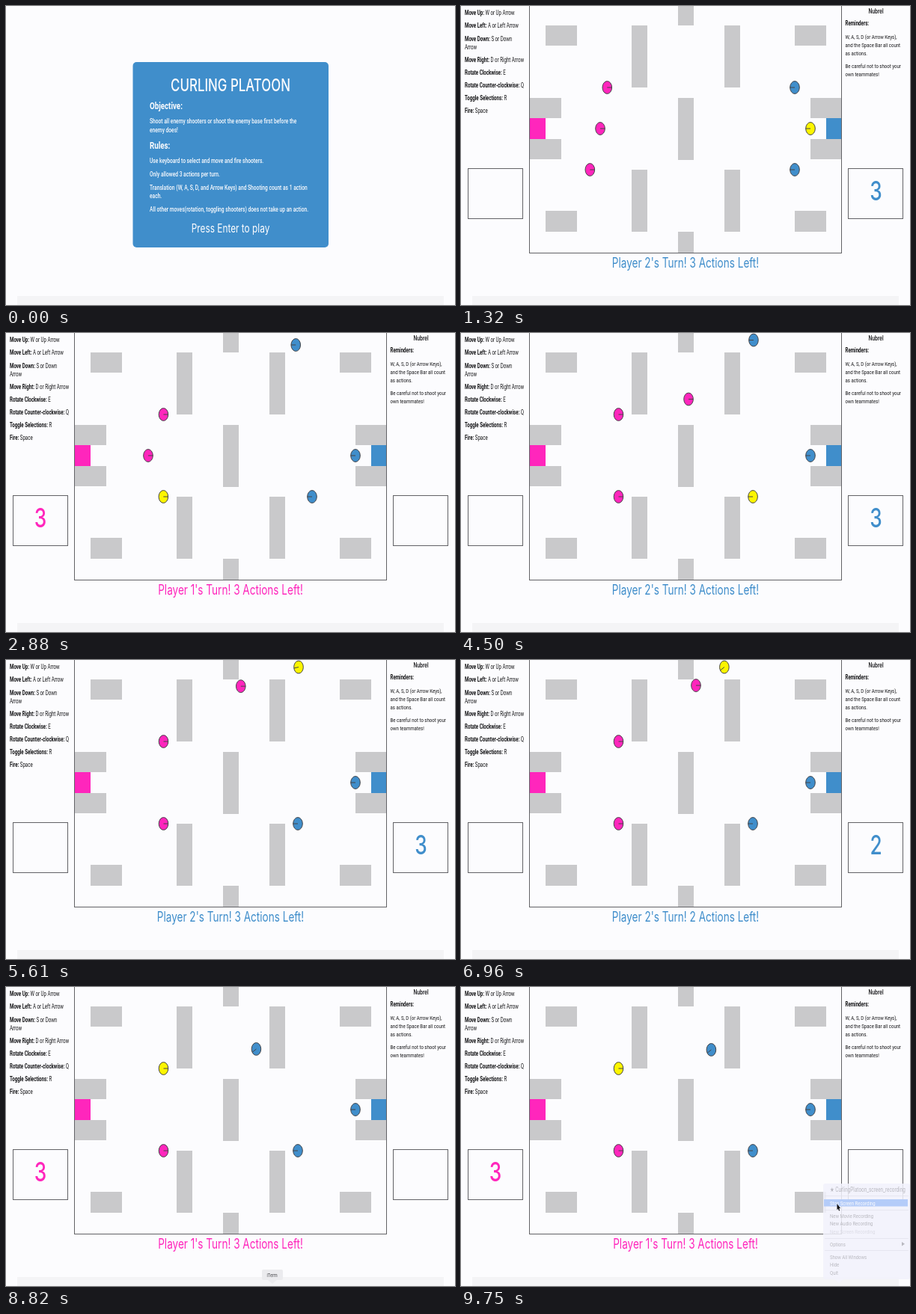
Recreate the animation shown at these times as an HTML page with a canvas. Size 600 by 400 pixels, loop 9.78 s.

```html
<!DOCTYPE html>
<html lang="en">
<head>
<meta charset="utf-8">
<title>Curling Platoon</title>
<style>
  html, body { margin: 0; width: 100%; height: 100%; overflow: hidden; background: #fcfcfe; }
  canvas { display: block; width: 600px; height: 400px; }
</style>
</head>
<body>
<canvas id="stage" width="600" height="400"></canvas>
<script>
const ctx = document.getElementById('stage').getContext('2d');
const LOOP = 9780, GAME_START = 360, FRICTION = 3.5;
const PAPER = '#fcfcfe', INK = '#161618', LINE = '#626266', WALL = '#c9c9cb';
const PINK = '#ff26bc', BLUE = '#408ecb', YELLOW = '#fdf500', WHITE = '#fcfcfe';
const BODY = 'Roboto, "Open Sans", sans-serif', DISPLAY = 'Inter, sans-serif';
const NARROW = 0.75;
const FIRE = 7300, HIT = 7450, AIM = 2.59;

const walls = [
  [290, -2, 21, 28], [290, 123, 21, 83], [290, 302, 21, 28]
];
for (const x of [113, 446]) walls.push([x, 26, 42, 27], [x, 274, 42, 28]);
for (const x of [228, 352]) walls.push([x, 26, 21, 83], [x, 219, 21, 83]);
for (const x of [92, 467]) walls.push([x, 123, 42, 27], [x, 178, 42, 27]);

// Each push: start time, total dx, total dy.
const shooters = [
  { team: 1, slot: 0, x: 154, y: 109, pushes: [[946, 56.5, 0]] },
  { team: 1, slot: 1, x: 133, y: 164, pushes: [[560, 57, 0], [3300, 0, -74.5], [3780, 124, 0], [4490, 0, -55.5]] },
  { team: 1, slot: 2, x: 154, y: 219, pushes: [[1209, 56.5, 0]] },
  { team: 2, slot: 0, x: 446, y: 109, pushes: [[1700, -64, 0], [2100, 0, -99.5], [2700, 9, 0], [6625, -56.6, 0], [7600, 0, 74.5]] },
  { team: 2, slot: 1, x: 467, y: 164, pushes: [] },
  { team: 2, slot: 2, x: 446, y: 219, pushes: [[2572, -56, 0]] }
];

// Time, player, actions left, selected slot.
const turns = [
  [0, 1, 3, 1], [560, 1, 2, 1], [760, 1, 2, 0], [946, 1, 1, 0], [1080, 1, 1, 2],
  [1209, 2, 3, 1], [1500, 2, 3, 0], [1700, 2, 2, 0], [2100, 2, 1, 0], [2350, 2, 1, 2],
  [2572, 1, 3, 2], [3050, 1, 3, 1], [3300, 1, 2, 1], [3780, 1, 1, 1],
  [4490, 2, 3, 2], [5000, 2, 3, 0], [6625, 2, 2, 0], [FIRE, 2, 1, 0], [7600, 1, 3, 0]
];

const progress = (t, from, to) => Math.min(1, Math.max(0, (t - from) / (to - from)));

function box(x, y, w, h, fill, radius = 0) {
  ctx.fillStyle = fill;
  ctx.beginPath();
  ctx.roundRect(x, y, w, h, radius);
  ctx.fill();
}

function frame(x, y, w, h) {
  ctx.strokeStyle = LINE;
  ctx.lineWidth = 1;
  ctx.strokeRect(x, y, w, h);
}

function squeezed(x, y, color, paint) {
  ctx.save();
  ctx.translate(x, y);
  ctx.scale(NARROW, 1);
  ctx.fillStyle = color;
  paint();
  ctx.restore();
}

function display(text, x, y, size, color, weight = 400) {
  squeezed(x, y, color, () => {
    ctx.textAlign = 'center';
    ctx.font = `${weight} ${size}px ${DISPLAY}`;
    ctx.fillText(text, 0, 0);
  });
}

// Left-aligned body copy with an optional bold lead-in.
function body(text, x, y, size, color, lead = '', weight = 400) {
  squeezed(x, y, color, () => {
    ctx.textAlign = 'left';
    ctx.font = `700 ${size}px ${BODY}`;
    ctx.fillText(lead, 0, 0);
    const indent = ctx.measureText(lead).width;
    ctx.font = `${weight} ${size}px ${BODY}`;
    ctx.fillText(text, indent, 0);
  });
}

function drawIntro() {
  box(169.5, 75, 261.5, 248, BLUE, 5);
  display('CURLING PLATOON', 300, 113.5, 22.5, WHITE, 500);
  body('', 192, 138, 13, WHITE, 'Objective:');
  body('', 192, 190.5, 13, WHITE, 'Rules:');
  const lines = [
    [157, 'Shoot all enemy shooters or shoot the enemy base first before the'],
    [168.5, 'enemy does!'],
    [210, 'Use keyboard to select and move and fire shooters.'],
    [228, 'Only allowed 3 actions per turn.'],
    [245.5, 'Translation (W, A, S, D, and Arrow Keys) and Shooting count as 1 action'],
    [257, 'each.'],
    [275, 'All other moves(rotation, toggling shooters) does not take up an action.']
  ];
  for (const [y, text] of lines) body(text, 192, y, 8.9, WHITE, '', 500);
  display('Press Enter to play', 300, 303, 15.8, WHITE);
}

function drawSidebars() {
  const controls = [
    [12, 'Move Up:', ' W or Up Arrow'], [29, 'Move Left:', ' A or Left Arrow'],
    [46.5, 'Move Down:', ' S or Down'], [57.5, '', 'Arrow'],
    [74.5, 'Move Right:', ' D or Right Arrow'], [91.5, 'Rotate Clockwise:', ' E'],
    [108.5, 'Rotate Counter-clockwise:', ' Q'], [125.5, 'Toggle Selections:', ' R'],
    [142.5, 'Fire:', ' Space']
  ];
  for (const [y, lead, text] of controls) body(text, 5, y, 8.2, INK, lead);
  display('Nubrel', 554.5, 10, 8.3, INK, 600);
  body('', 513.5, 26, 8.2, INK, 'Reminders:');
  const notes = [
    [43.5, 'W, A, S, D (or Arrow Keys),'], [54.5, 'and the Space Bar all count'],
    [65.5, 'as actions.'], [82.5, 'Be careful not to shoot your'], [93.5, 'own teammates!']
  ];
  for (const [y, text] of notes) body(text, 513.5, y, 8.1, INK);
  frame(9.5, 217.5, 73, 67);
  frame(517.5, 217.5, 73, 67);
}

function position(shooter, t) {
  let { x, y } = shooter;
  for (const [start, dx, dy] of shooter.pushes) {
    const covered = t < start ? 0 : 1 - Math.exp(-FRICTION * (t - start) / 1000);
    x += dx * covered;
    y += dy * covered;
  }
  return [x, y];
}

function drawShooter(shooter, t, selected) {
  const [x, y] = position(shooter, t);
  let angle = shooter.team === 1 ? 0 : Math.PI;
  if (shooter === shooters[3]) angle += (AIM - Math.PI) * progress(t, 5300, 6300);
  ctx.beginPath();
  ctx.ellipse(x, y, 6.3, 8.4, 0, 0, 2 * Math.PI);
  ctx.fillStyle = selected ? YELLOW : shooter.team === 1 ? PINK : BLUE;
  ctx.fill();
  ctx.strokeStyle = '#444448';
  ctx.lineWidth = 1;
  ctx.stroke();
  ctx.beginPath();
  ctx.moveTo(x, y);
  ctx.lineTo(x + 6.3 * Math.cos(angle), y + 8.4 * Math.sin(angle));
  ctx.stroke();
}

function drawBullet(t) {
  if (t < FIRE || t >= HIT) return;
  const [x, y] = position(shooters[3], FIRE);
  const p = progress(t, FIRE, HIT);
  ctx.beginPath();
  ctx.ellipse(x + (316 - x) * p, y + (32 - y) * p, 1.5, 2, 0, 0, 2 * Math.PI);
  ctx.fillStyle = INK;
  ctx.fill();
}

function drawGame(t) {
  const [, player, actions, slot] = turns.findLast(turn => t >= turn[0]);
  const color = player === 1 ? PINK : BLUE;
  drawSidebars();
  for (const wall of walls) box(...wall, WALL);
  box(92, 150, 21, 28, PINK);
  box(488, 150, 21, 28, BLUE);
  frame(91.5, -1.5, 417, 332);
  for (const shooter of shooters) {
    if (shooter === shooters[1] && t >= HIT) continue;
    drawShooter(shooter, t, shooter.team === player && shooter.slot === slot);
  }
  drawBullet(t);
  display(actions, player === 1 ? 46 : 554.5, 259.5, 35, color, 500);
  display(`Player ${player}'s Turn! ${actions} Actions Left!`, 300, 350, 18.1, color);
}

function tail(x, y, fill) {
  ctx.fillStyle = fill;
  ctx.beginPath();
  ctx.moveTo(x - 6, y);
  ctx.lineTo(x + 6, y);
  ctx.lineTo(x, y + 5);
  ctx.fill();
}

function drawTooltip() {
  box(342, 378, 28, 14, '#ebebee', 2);
  tail(356, 392, '#ebebee');
  body('iTerm', 348.5, 387.5, 7.5, '#4c4c50');
}

function drawMenu(t) {
  const fill = 'rgba(243, 243, 252, 0.86)', gray = '#b9b9c0';
  box(484, 263, 116, 128, fill, 3);
  tail(505, 391, fill);
  const highlighted = t >= 9570;
  if (highlighted) box(485, 284, 112, 9.5, '#b4ccf9');
  for (const y of [279, 298, 336, 352]) box(486, y, 112, 0.7, '#e2e2ec');
  const items = [
    [291.5, 'Stop Screen Recording', highlighted ? WHITE : gray],
    [308.5, 'New Movie Recording', gray], [319, 'New Audio Recording', gray],
    [329.5, 'New Screen Recording', '#dcdce6'], [346.5, 'Options', gray],
    [363.5, 'Show All Windows', gray], [374, 'Hide', gray], [384.5, 'Quit', gray]
  ];
  body('★ CurlingPlatoon_screen_recording', 493, 273.5, 8.5, gray);
  for (const [y, text, color] of items) body(text, 493, y, 8, color);
  ctx.fillStyle = gray;
  ctx.beginPath();
  ctx.moveTo(589, 341);
  ctx.lineTo(593, 343.8);
  ctx.lineTo(589, 346.5);
  ctx.fill();
}

function drawCursor(t) {
  const p = progress(t, 9250, 9600);
  ctx.save();
  ctx.translate(506 - 3.5 * p, 394 - 104 * p);
  ctx.beginPath();
  for (const [x, y] of [[0, 0], [0, 8], [1.5, 6.7], [2.6, 9.5], [3.7, 9], [2.7, 6.2], [4.6, 6]]) ctx.lineTo(x, y);
  ctx.closePath();
  ctx.fillStyle = '#101012';
  ctx.fill();
  ctx.restore();
}

function draw(t) {
  box(0, 0, 600, 400, PAPER);
  box(15, 388, 570, 12, '#f4f4f6');
  if (t < GAME_START) drawIntro();
  else drawGame(t);
  if (t >= 8730 && t < 8940) drawTooltip();
  if (t >= 9250) {
    drawMenu(t);
    drawCursor(t);
  }
}

const began = performance.now();
function tick() {
  draw((performance.now() - began) % LOOP);
  requestAnimationFrame(tick);
}
tick();
</script>
</body>
</html>
```
